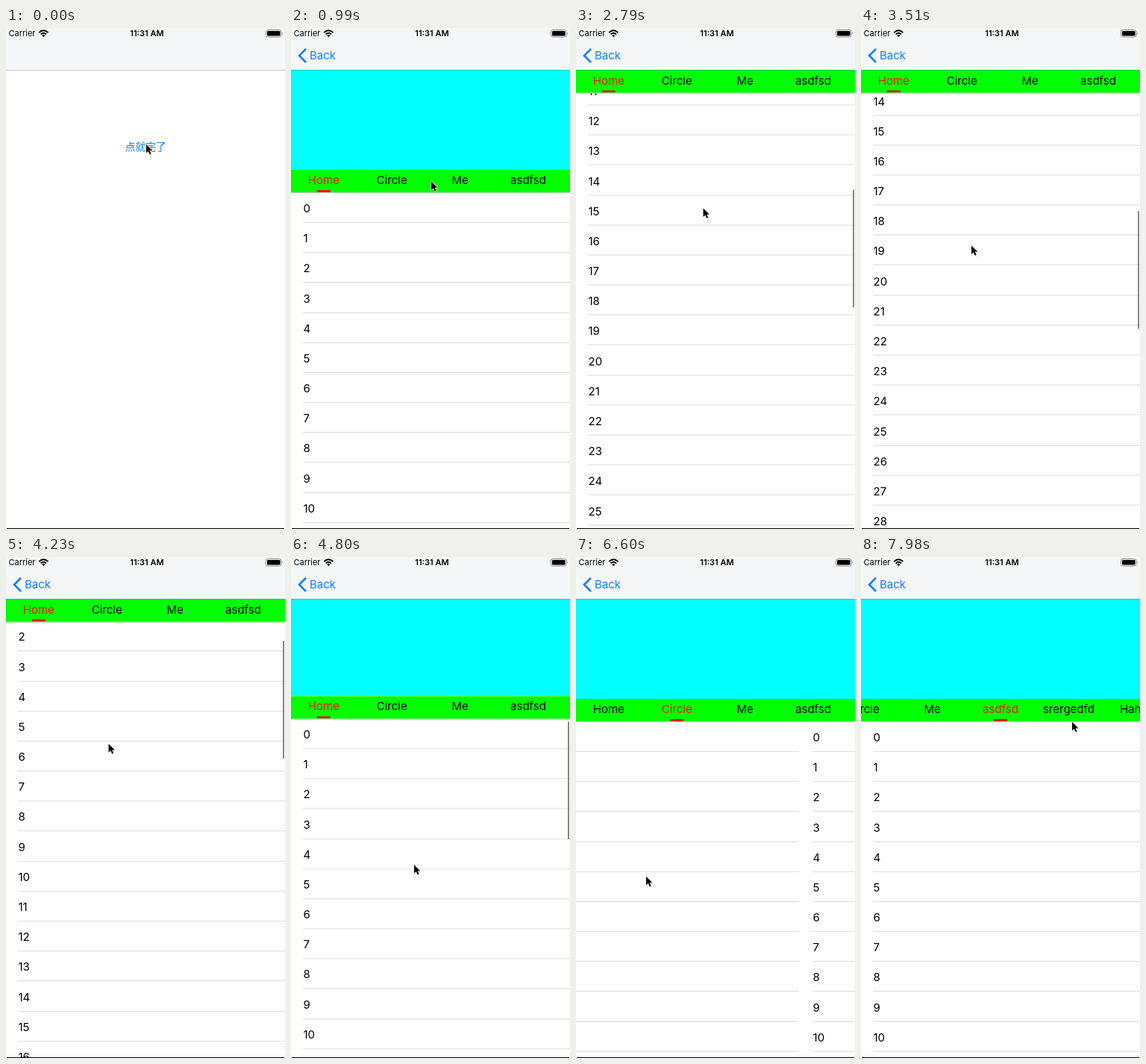
Recreate the animation shown at these times as an HTML page. Size 374x671 px, loop 8000 ms.

```html
<!DOCTYPE html>
<html lang="en">
<head>
<meta charset="utf-8">
<style>
  html, body { margin: 0; width: 100%; height: 100%; overflow: hidden; background: #fff; }
  #stage { position: relative; width: 374px; height: 671px; overflow: hidden; background: #fff;
    font: 15px/20px Inter, Roboto, sans-serif; color: #000; white-space: nowrap; }
  #stage div, #stage svg { position: absolute; }
  #home, #detail { left: 0; top: 56px; width: 374px; height: 615px; background: #fff; overflow: hidden; }
  #button { left: 0; width: 374px; top: 92px; text-align: center; color: #0f80f0;
    font: 13.8px/20px "Noto Sans CJK SC", "Noto Sans CJK", sans-serif; }
  #shade { inset: 0; background: #000; }
  #header { left: 0; top: 0; width: 374px; background: #0ff; }
  #tabs { left: 0; top: 0; width: 374px; height: 30px; background: #0f0; overflow: hidden;
    border-bottom: 1px solid #b9c9b9; }
  #strip { left: 0; top: 0; height: 30px; }
  .tab { top: 4px; width: 92px; text-align: center; }
  #mark { top: 27px; width: 18px; height: 3px; background: #f01414; }
  .page { top: 0; width: 374px; }
  .row { left: 16px; width: 358px; height: 40px; line-height: 41px; border-bottom: 1px solid #dcdcdf;
    box-sizing: border-box; text-indent: .5px; }
  #thumb { left: 371px; width: 2px; height: 158px; border-radius: 1px; background: #858585; }
  #nav { left: 0; top: 0; width: 374px; height: 56px; background: #f5f6f7 padding-box;
    border-bottom: 1px solid #0003; }
  #status { left: 0; top: 0; width: 374px; height: 15px; font-size: 11px; line-height: 15px; }
  #back { left: 0; top: 0; width: 100px; height: 56px; color: #147efb; }
  #edge { left: 1px; top: 670px; width: 372px; height: 1px; background: #000; }
</style>
</head>
<body>
<div id="stage">
  <div id="home"><div id="button">点就完了</div><div id="shade"></div></div>
  <div id="detail">
    <div id="pages"></div>
    <div id="header"></div>
    <div id="tabs"><div id="strip"><div id="mark"></div></div></div>
    <div id="thumb"></div>
  </div>
  <div id="nav">
    <div id="back">
      <svg width="30" height="56"><path d="M20 28 11 37 20 46" fill="none" stroke="#147efb" stroke-width="2.6"/></svg>
      <div style="left:25px;top:27px">Back</div>
    </div>
  </div>
  <div id="status">
    <div style="left:3.5px;top:0">Carrier</div>
    <div style="left:2px;width:374px;text-align:center;font-weight:600">11:31 AM</div>
    <svg width="374" height="15">
      <path d="M44.2 6.1Q50.3.5 56.4 6.1M46.6 8.5Q50.3 5.2 54 8.5" fill="none" stroke="#000" stroke-width="1.9"/>
      <path d="M48.2 10Q50.3 8.2 52.4 10L50.3 12.2Z"/>
      <rect x="348.5" y="2.5" width="20.5" height="9.5" rx="2.4" fill="none" stroke="#888"/>
      <rect x="350" y="4" width="17.5" height="6.5" rx="1.2"/>
      <path d="M370.2 5.5Q372 7.2 370.2 9Z" fill="#888"/>
    </svg>
  </div>
  <div id="edge"></div>
  <svg id="cursor" width="16" height="20" style="left:-1px;top:-.5px;overflow:visible">
    <path d="M3 4V15.5L5.7 13 7.6 17.3 9.6 16.4 7.7 12.3H11.3Z" fill="#0002"/>
    <path d="M2 2V13.5L4.7 11 6.6 15.3 8.6 14.4 6.7 10.3H10.3Z" stroke="#fff" stroke-width="1.6"
      paint-order="stroke" stroke-linejoin="round"/>
  </svg>
</div>
<script>
const LOOP = 8000, ROW = 40.18, HEAD = 134, PITCH = 376, TAB = 91.4, FIRST_TAB = 43.8, MIDDLE = 187;
const $ = id => document.getElementById(id);
const clamp = (v, lo = 0, hi = 1) => Math.min(hi, Math.max(lo, v));
const easeOut = u => 1 - (1 - clamp(u)) ** 3;
const smooth = u => (u = clamp(u), u * u * (3 - 2 * u));
const move = (node, x, y) => { node.style.transform = `translate(${x}px,${y}px)`; };

function add(parent, className, text = '') {
  const node = document.createElement('div');
  node.className = className;
  node.textContent = text;
  return parent.appendChild(node);
}

const rest = (at, length, x, y) => ({ at, end: at + length, x, y, dx: 0, dy: 0, coast: 0, flip: 0 });
const pull = (at, length, x, y, dx, dy, coast) => ({ ...rest(at, length, x, y), dx, dy, coast });
// A swipe always carries on to the next whole page.
const swipe = (at, length, x, y, dx) => ({ ...rest(at, length, x, y), dx, flip: 1 });

const gestures = [
  rest(0, 820, 187, 154),
  pull(1400, 430, 187, 390, -7, -182, -257),
  pull(2400, 480, 172, 400, -3, -197, -120),
  pull(3430, 270, 148, 240, -3, 165, 362),
  pull(4212, 220, 136, 234, 6, 165, 64),
  pull(5340, 180, 203, 430, 4, 70, -70),
  swipe(5860, 230, 270, 432, -150),
  swipe(6490, 200, 168, 426, -135),
  swipe(7180, 200, 215, 424, -140),
  rest(7980, 20, 282, 219),
];

// The pointer drags in a straight line; list and pages follow it and then coast.
function pose(t) {
  const state = { x: 0, y: 0, scroll: 0, page: 0 };
  gestures.forEach((g, i) => {
    if (t < g.at) return;
    const next = gestures[i + 1] || g;
    const u = clamp((t - g.at) / (g.end - g.at));
    const glide = easeOut((t - g.end) / Math.min(600, Math.max(1, next.at - g.end)));
    const travel = smooth((t - g.end) / Math.max(1, next.at - g.end));
    const endX = g.x + g.dx, endY = g.y + g.dy;
    state.x = g.x + g.dx * u + (next.x - endX) * travel;
    state.y = g.y + g.dy * u + (next.y - endY) * travel;
    if (g.flip) {
      const dragged = -g.dx / PITCH;
      state.page += dragged * u + (1 - dragged) * glide;
    } else {
      state.scroll -= g.dy * u + g.coast * glide;
    }
  });
  if (state.scroll < 0) state.scroll *= .2;
  return state;
}

const tabs = ['Home', 'Circle', 'Me', 'asdfsd', 'srergedfd', 'Hahah'].map((name, i) => {
  const tab = add($('strip'), 'tab', name);
  tab.style.left = i * TAB + FIRST_TAB - 46 + 'px';
  return tab;
});
const pages = [0, 1, 2, 3].map(() => {
  const page = add($('pages'), 'page');
  for (let i = 0; i < 53; i++) add(page, 'row', i).style.top = i * ROW + 'px';
  return page;
});

function draw(t) {
  const push = easeOut((t - 140) / 560);
  move($('detail'), 374 * (1 - push), 0);
  move($('home'), -112 * push, 0);
  $('shade').style.opacity = .1 * push;
  $('button').style.opacity = t < 40 ? 1 : .3 + .7 * clamp((t - 140) / 250);
  move($('back'), 90 * (1 - push), 0);
  $('back').style.opacity = push;

  const { x, y, scroll, page } = pose(t);
  const barTop = Math.max(.5, HEAD - scroll);
  $('header').style.height = barTop + 'px';
  move($('tabs'), 0, barTop);
  move($('thumb'), 0, barTop + 34 + .27 * Math.max(0, scroll - HEAD));
  $('thumb').style.opacity = clamp((t - 1390) / 90) * (1 - clamp((t - 5700) / 150));
  pages.forEach((node, i) => move(node, (i - page) * PITCH, HEAD + 31 - (i ? 0 : scroll)));

  const chosen = Math.round(page), whole = Math.floor(page);
  const mark = FIRST_TAB + TAB * (whole + smooth((page - whole - .45) / .55));
  tabs.forEach((tab, i) => { tab.style.color = i === chosen ? '#f01414' : '#000'; });
  move($('mark'), mark - 9, 0);
  move($('strip'), -Math.max(0, mark - MIDDLE), 0);
  move($('cursor'), x, y);
}

const begin = performance.now();
function tick() {
  draw((performance.now() - begin) % LOOP);
  requestAnimationFrame(tick);
}
tick();
</script>
</body>
</html>
```
